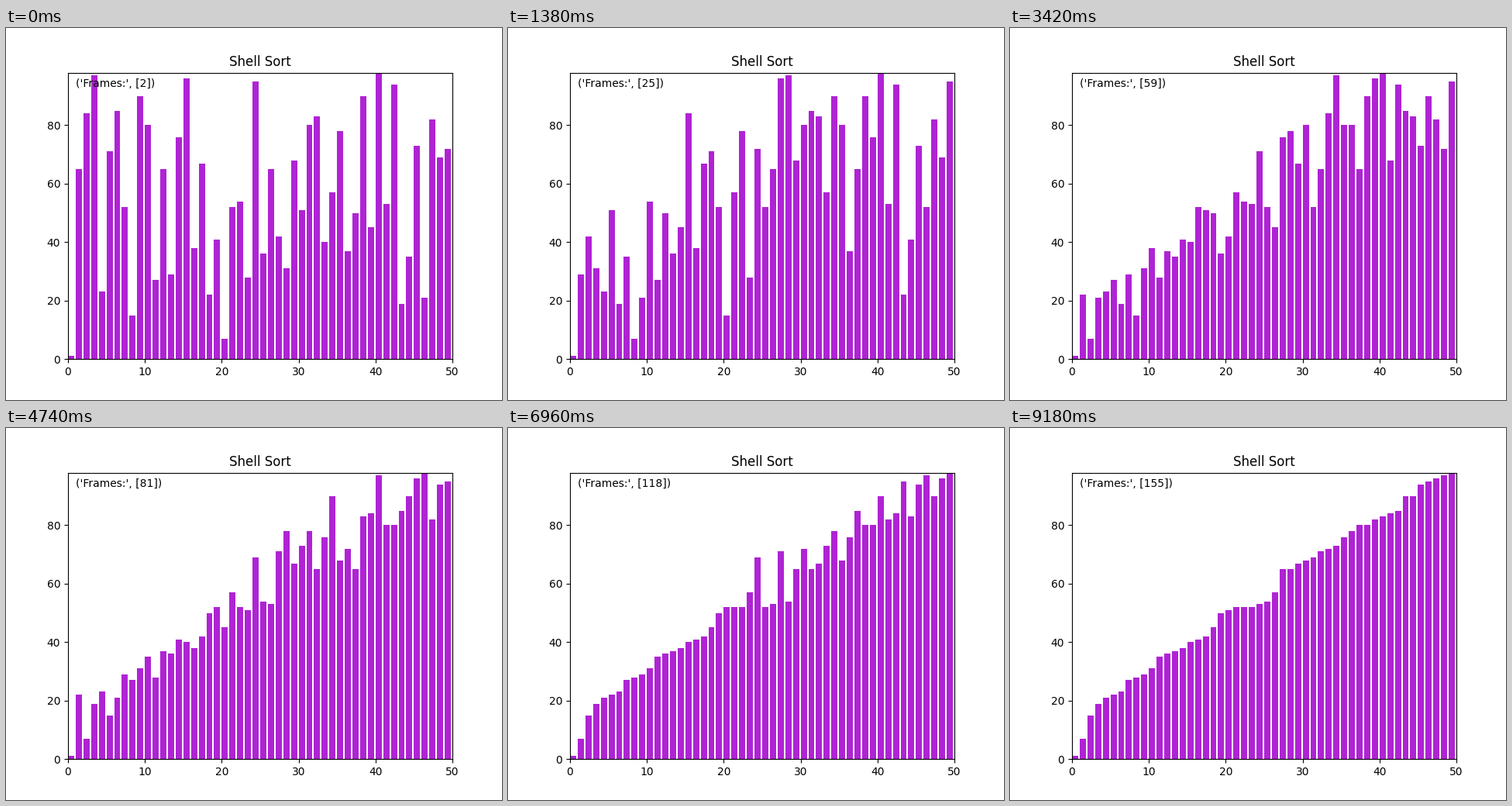
A matplotlib script that plays this animation: 640x480 px, repeating every 9240 ms.

```python
import matplotlib.pyplot as plt
from matplotlib.animation import FuncAnimation

# The unsorted input; every later state follows from the sort itself.
VALUES = [
    1, 65, 84, 97, 23, 71, 85, 52, 15, 90, 80, 27, 65, 29, 76, 96, 38,
    67, 22, 41, 7, 52, 54, 28, 95, 36, 52, 42, 31, 68, 51, 80, 83, 40,
    57, 78, 37, 50, 90, 45, 98, 53, 94, 19, 35, 73, 21, 82, 69, 72,
]


def shell_sort(values):
    """Yield the list after every shift and at the end of every pass."""
    a = list(values)
    gap = len(a) // 2
    while gap:
        for i in range(gap, len(a)):
            item, j = a[i], i
            while j >= gap and a[j - gap] > item:
                a[j] = a[j - gap]
                j -= gap
                yield a[:]
            a[j] = item
        yield a[:]
        gap //= 2


states = list(shell_sort(VALUES))

fig, ax = plt.subplots(figsize=(6.4, 4.8), dpi=100)
ax.set_title("Shell Sort")
ax.set_xlim(0, len(VALUES))
ax.set_ylim(0, max(VALUES))
bars = ax.bar(range(len(VALUES)), states[0], align="edge", color="#af23d4")
label = ax.text(0.02, 0.95, "", transform=ax.transAxes)


def update(step):
    for bar, height in zip(bars, states[step]):
        bar.set_height(height)
    label.set_text(f"('Frames:', [{step + 2}])")
    return [*bars, label]


anim = FuncAnimation(fig, update, frames=len(states), interval=60, repeat=True)
plt.show()
```
